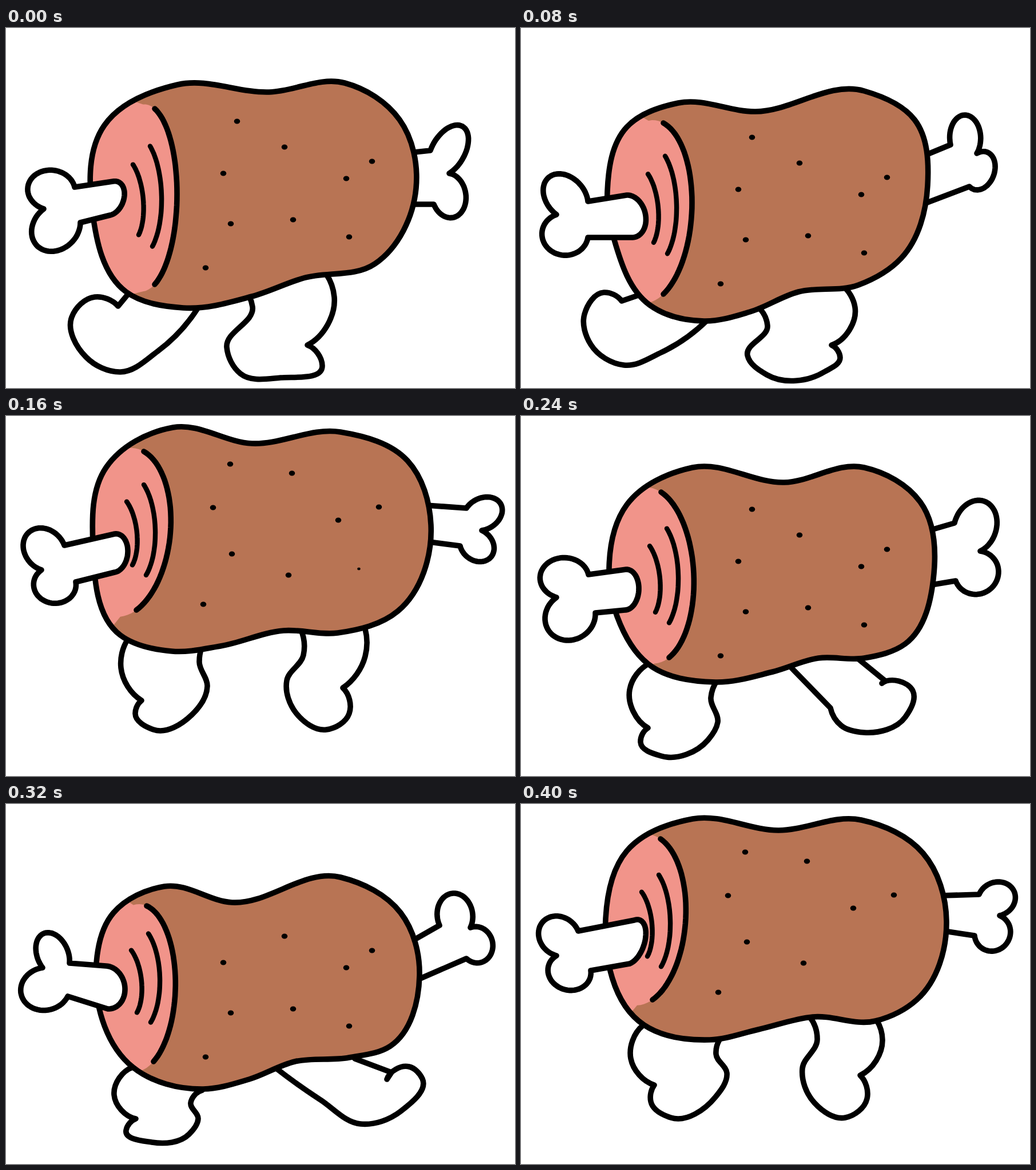
These frames come from a looping animation (890x629 px, 0.48 s). An HTML page:

```html
<!DOCTYPE html>
<html lang="en">
<head>
<meta charset="utf-8">
<title>Walking ham</title>
<style>
  html, body { margin: 0; width: 100%; height: 100%; overflow: hidden; background: #fff; }
  svg { display: block; width: 100vw; height: 100vh; }
  .line { stroke: #000; stroke-width: 9.6; stroke-linecap: round; stroke-linejoin: round; }
  .thin { stroke-width: 8.4; }
  .white { fill: #fff; }
  .open { fill: none; }
</style>
</head>
<body>
<svg viewBox="0 0 890 629">
  <clipPath id="inside"><path id="clip"/></clipPath>
  <path id="legs" class="line white"/>
  <path id="tail" class="line white"/>
  <path id="skin" fill="#b87454"/>
  <path id="meat" fill="#f1948a" clip-path="url(#inside)"/>
  <path id="edge" class="line open"/>
  <path id="cut" class="line open"/>
  <path id="rings" class="line thin open"/>
  <path id="dots"/>
  <path id="head" class="line white"/>
</svg>
<script>
const STEP = 80;

// Pepper spots: x,y and an optional radius.
const nearSpots = '404,163 487,208 380,254 640,233 595,263 393,342 502,335 600,365 349,419';
const highSpots = '392,84 500,100 362,160 652,159 581,182 395,241 494,278 617,267,2.5 345,329';

// Key points per pose:
//   cut   start, tip, end
//   head  neck, shaft end (3), neck, knob tip, notch, knob tip
//   tail  root, neck, knob tip, notch, knob tip, neck, root
//   legs  smooth runs, "|" marks a sharp corner
const poses = [
  {
    body: '300,99 460,112 592,96 688,160 717,280 645,412 520,437 430,469 310,489 210,461 151,320 172,170',
    cut: '260,141 299,290 260,448',
    head: '120,278 187,268 207,293 182,327 130,340 66,388 66,316 52,256',
    tail: '705,218 742,214 803,176 775,254 800,316 748,308 705,308',
    legs: ['215,463 196,486|155,470 115,505 140,575 200,601 265,565 335,490',
           '425,468 431,487 386,558 410,604 480,611 553,590 527,554|574,470 560,430'],
    spots: nearSpots, drop: 0
  },
  {
    body: '275,131 410,146 600,110 688,160 711,275 665,402 590,449 485,461 400,496 320,512 225,484 163,370 151,285 185,173',
    cut: '249,166 299,305 249,465',
    head: '117,303 185,292 218,328 195,366 117,366 52,389 62,326 55,257',
    tail: '700,225 751,204 782,153 797,219 828,252 784,277 705,307',
    legs: ['208,466 176,477|145,462 111,500 122,553 180,589 245,567 325,511',
           '415,488 431,520 396,572 430,606 530,601 558,576 543,554|584,488 562,450'],
    spots: nearSpots, drop: 28
  },
  {
    body: '292,20 430,48 585,28 702,78 743,190 685,341 580,379 485,375 375,402 290,411 200,383 152,225 175,90',
    cut: '241,62 288,195 228,339',
    head: '102,226 190,206 213,236 190,273 122,290 72,325 62,269 38,205',
    tail: '735,156 805,161 864,152 832,200 844,250 794,227 740,220',
    legs: ['213,390 201,440 237,497|226,520 258,548 325,522 352,472 338,430 342,405',
           '515,372 520,418 491,462 508,520 560,548 600,520 589,475|628,420 628,372'],
    spots: highSpots, drop: 0
  },
  {
    body: '300,90 460,116 600,90 698,150 722,275 672,398 600,423 520,423 440,447 340,465 222,433 168,350 154,265 185,155',
    cut: '245,133 302,275 259,422',
    head: '118,277 184,268 206,303 182,339 130,344 66,389 62,317 48,256',
    tail: '710,201 758,187 822,157 803,236 826,297 760,288 718,295',
    legs: ['225,432 190,478 222,545|209,570 245,594 327,566 344,535 332,492 343,462',
           '465,432 541,510|560,541 600,553 672,526 685,480 631,467|637,463|588,423'],
    spots: nearSpots, drop: 0
  },
  {
    body: '277,144 395,172 585,128 690,190 723,300 672,423 600,443 505,450 425,481 345,498 222,460 157,300 188,190',
    cut: '246,178 296,300 258,450',
    head: '111,278 175,283 208,322 178,358 108,336 34,347 64,286 70,225',
    tail: '700,245 758,212 785,156 812,216 851,252 805,270 715,309',
    legs: ['222,460 189,508 227,550|210,570 255,591 320,577 336,550 323,522 343,500',
           '470,460 550,517 620,559 690,537 728,480 705,459 666,481|674,469|610,445'],
    spots: nearSpots, drop: 23, skip: 0
  },
  {
    body: '300,26 450,46 595,28 703,86 744,205 692,342 620,379 510,372 415,394 330,412 215,386 148,200 185,82',
    cut: '244,61 288,200 230,342',
    head: '100,222 198,203 218,232 190,279 122,291 70,322 62,265 38,206',
    tail: '735,160 801,158 857,145 837,195 843,250 793,230 740,222',
    legs: ['213,387 192,445 233,491|227,520 262,548 340,512 360,470 341,437 347,412',
           '505,372 518,412 492,462 513,522 567,548 605,515 593,474|632,412 622,378'],
    spots: highSpots, drop: 0, skip: 7
  }
];

const parse = s => s.split(' ').map(p => p.split(',').map(Number));
const mix = f => [0, 1].map(f);
const dist = (a, b) => Math.hypot(b[0] - a[0], b[1] - a[1]);
const unit = (a, b) => mix(k => (b[k] - a[k]) / dist(a, b));
const join = pts => pts.map(p => p.map(x => x.toFixed(1)).join()).join('L');

// Elliptic arc from a to b whose crest is tip; angle is half its sweep,
// reach extends the drawn part beyond a and b.
function bow(a, tip, b, angle, reach = angle) {
  const rad = Math.PI / 180, n = 40, pts = [];
  for (let i = 0; i <= n; i++) {
    const t = (2 * i / n - 1) * reach * rad;
    const back = (1 - Math.cos(t)) / (1 - Math.cos(angle * rad));
    const side = Math.sin(t) / Math.sin(angle * rad);
    pts.push(mix(k => tip[k] + ((a[k] + b[k]) / 2 - tip[k]) * back + (b[k] - a[k]) / 2 * side));
  }
  return pts;
}

function tangent(a, b, c) {
  const d = dist(a, b), e = dist(b, c), u = unit(a, b), v = unit(b, c);
  const m = mix(k => u[k] * e + v[k] * d);
  return unit([0, 0], m);
}

// Smooth cubic curve through the points.
function spline(pts, closed) {
  const n = pts.length, at = i => pts[(i + n) % n];
  const dirs = pts.map((p, i) => closed || (i > 0 && i < n - 1) ? tangent(at(i - 1), p, at(i + 1)) : null);
  if (!closed) {
    const mirror = (u, t) => t ? mix(k => 2 * (u[0] * t[0] + u[1] * t[1]) * u[k] - t[k]) : u;
    dirs[0] = mirror(unit(pts[0], pts[1]), dirs[1]);
    dirs[n - 1] = mirror(unit(pts[n - 2], pts[n - 1]), n > 2 ? dirs[n - 2] : null);
  }
  let d = '';
  for (let i = 0; i < (closed ? n : n - 1); i++) {
    const a = pts[i], b = at(i + 1), h = dist(a, b) / 3;
    const s = dirs[i], e = dirs[(i + 1) % n];
    d += 'C' + [mix(k => a[k] + s[k] * h), mix(k => b[k] - e[k] * h), b].join(' ');
  }
  return d;
}

function leg(text) {
  const runs = text.split('|').map(parse);
  let last = runs[0].shift(), d = 'M' + last;
  for (const run of runs) {
    d += spline([last, ...run], false);
    last = run[run.length - 1];
  }
  return d;
}

function loop(text) {
  const pts = parse(text);
  return 'M' + pts[0] + spline(pts, true) + 'Z';
}

const knob = (a, tip, b) => bow(a, tip, b, 120);

function headBone(text) {
  const [neckA, e1, end, e2, neckB, tipB, notch, tipA] = parse(text);
  return 'M' + join([...bow(e1, end, e2, 90), ...knob(neckB, tipB, notch), ...knob(notch, tipA, neckA)]) + 'Z';
}

function tailBone(text) {
  const [rootA, neckA, tipA, notch, tipB, neckB, rootB] = parse(text);
  return 'M' + join([rootA, ...knob(neckA, tipA, notch), ...knob(notch, tipB, neckB), rootB]);
}

// A grain line parallel to the cut: a shorter copy shifted inwards.
function ring([a, tip, b], dx, dy, size, topX, lowX) {
  const half = (b[1] - a[1]) / 2 * size, x = tip[0] + dx, y = tip[1] + dy;
  return 'M' + join(bow([x + topX, y - half], [x, y], [x + lowX, y + half], 55));
}

function dot([x, y, r = 4.9]) {
  const w = r * 1.08, h = r * 0.94;
  return `M${x - w} ${y}a${w} ${h} 0 1 0 ${2 * w} 0a${w} ${h} 0 1 0 ${-2 * w} 0Z`;
}

const drawings = poses.map(p => {
  const body = loop(p.body), cut = parse(p.cut);
  const spots = parse(p.spots).filter((s, i) => i !== p.skip);
  return {
    clip: body, skin: body, edge: body,
    meat: 'M80,500L80,80L' + join(bow(...cut, 70, 90)) + 'Z',
    cut: 'M' + join(bow(...cut, 70)),
    rings: ring(cut, -27, 4, 0.57, -20, -16) + ring(cut, -59, 10, 0.4, -18, -8),
    head: headBone(p.head),
    tail: tailBone(p.tail),
    legs: p.legs.map(leg).join(''),
    dots: spots.map(([x, y, r]) => dot([x, y + p.drop, r])).join('')
  };
});

let shown = -1;
function draw(time) {
  const i = Math.floor(time / STEP) % drawings.length;
  if (i === shown) return;
  shown = i;
  for (const [id, d] of Object.entries(drawings[i])) document.getElementById(id).setAttribute('d', d);
}

let start = null;
function tick(now) {
  if (start === null) start = now;
  draw(Math.max(0, now - start));
  requestAnimationFrame(tick);
}
draw(0);
requestAnimationFrame(tick);
</script>
</body>
</html>
```
